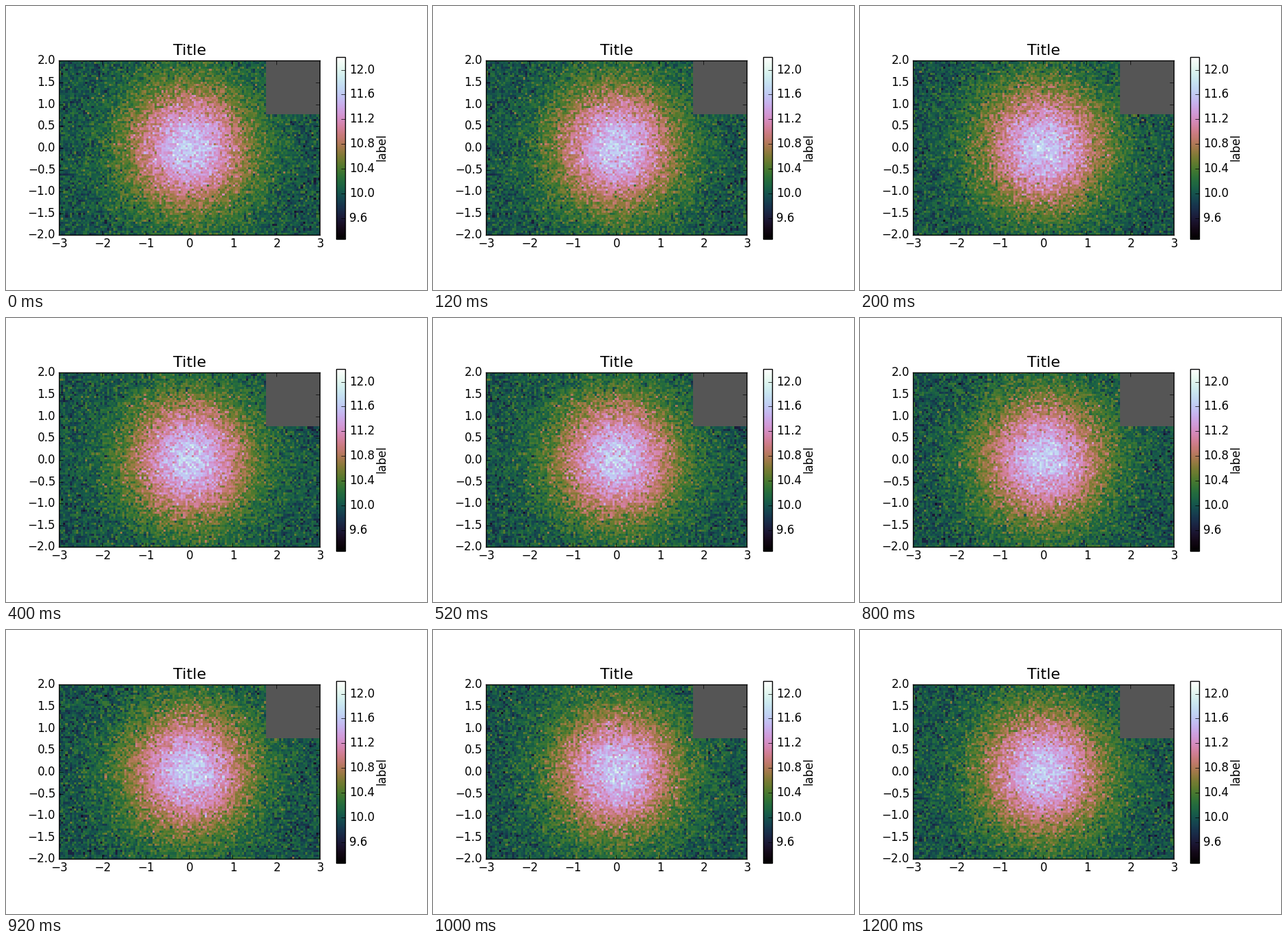
Write a matplotlib script that moves like this. It is 612 px wide and 412 px high and loops after 1400 ms.

```python
import numpy as np
import matplotlib.pyplot as plt
from matplotlib.animation import FuncAnimation
from matplotlib.transforms import ScaledTranslation

plt.style.use("classic")
plt.rcParams["font.family"] = "DejaVu Sans"

WIDTH, HEIGHT, DPI = 612, 412, 100
COLS, ROWS = 120, 80
V_MIN, V_MAX = 9.267, 12.205
NOISE = 0.17
FRAMES, CYCLE = 7, 6  # the last step shows the first sample again

x = -3 + (np.arange(COLS) + 0.5) * 6 / COLS
y = 2 - (np.arange(ROWS) + 0.5) * 4 / ROWS
X, Y = np.meshgrid(x, y)
BUMP = 10 + 1.6 * np.exp(-(X**2 + Y**2) / 2)
MASK = (X > 1.75) & (Y > 0.75)


def sample(frame):
    """Noisy Gaussian bump with a masked corner."""
    rng = np.random.default_rng(100 + frame % CYCLE)
    return np.ma.array(BUMP + rng.normal(0, NOISE, BUMP.shape), mask=MASK)


def pixel_box(left, top, width, height):
    """Axes rectangle from pixels measured from the top left corner."""
    return [left / WIDTH, 1 - (top + height) / HEIGHT, width / WIDTH, height / HEIGHT]


def nudge(texts, right, up):
    """Shift text artists by whole pixels."""
    shift = ScaledTranslation(right / DPI, up / DPI, fig.dpi_scale_trans)
    for text in texts:
        text.set_transform(text.get_transform() + shift)


fig = plt.figure(figsize=(WIDTH / DPI, HEIGHT / DPI), dpi=DPI, facecolor="white")

ax = fig.add_axes(pixel_box(76.5, 79.4, 379.44, 253.08))
cmap = plt.get_cmap("cubehelix").copy()
cmap.set_bad("#555555")
image = ax.imshow(sample(0), cmap=cmap, vmin=V_MIN, vmax=V_MAX, extent=(-3, 3, -2, 2),
                  origin="upper", interpolation="nearest", aspect="auto")
ax.set_xticks(range(-3, 4))
ax.set_yticks(np.arange(-2, 2.1, 0.5))
title = ax.set_title("Title", fontsize=16)

bar_ax = fig.add_axes(pixel_box(479.65, 74.16, 13.18, 263.68))
levels = np.arange(9.6, 12.1, 0.4)
bar = fig.colorbar(image, cax=bar_ax, ticks=levels)
bar.ax.set_yticklabels([f"{v:.1f}" for v in levels])
fig.text(551 / WIDTH, 207 / HEIGHT, "label", fontsize=12, rotation=90,
         rotation_mode="anchor", ha="center", va="baseline")

nudge([title], 1, 1)
nudge(ax.get_xticklabels(), 1, 2)
nudge(ax.get_yticklabels(), 1, 0)
nudge(bar.ax.get_yticklabels(), 1, 0)


def update(frame):
    image.set_data(sample(frame))
    return [image]


anim = FuncAnimation(fig, update, frames=FRAMES, interval=200, repeat=True, repeat_delay=0)
plt.show()
```
